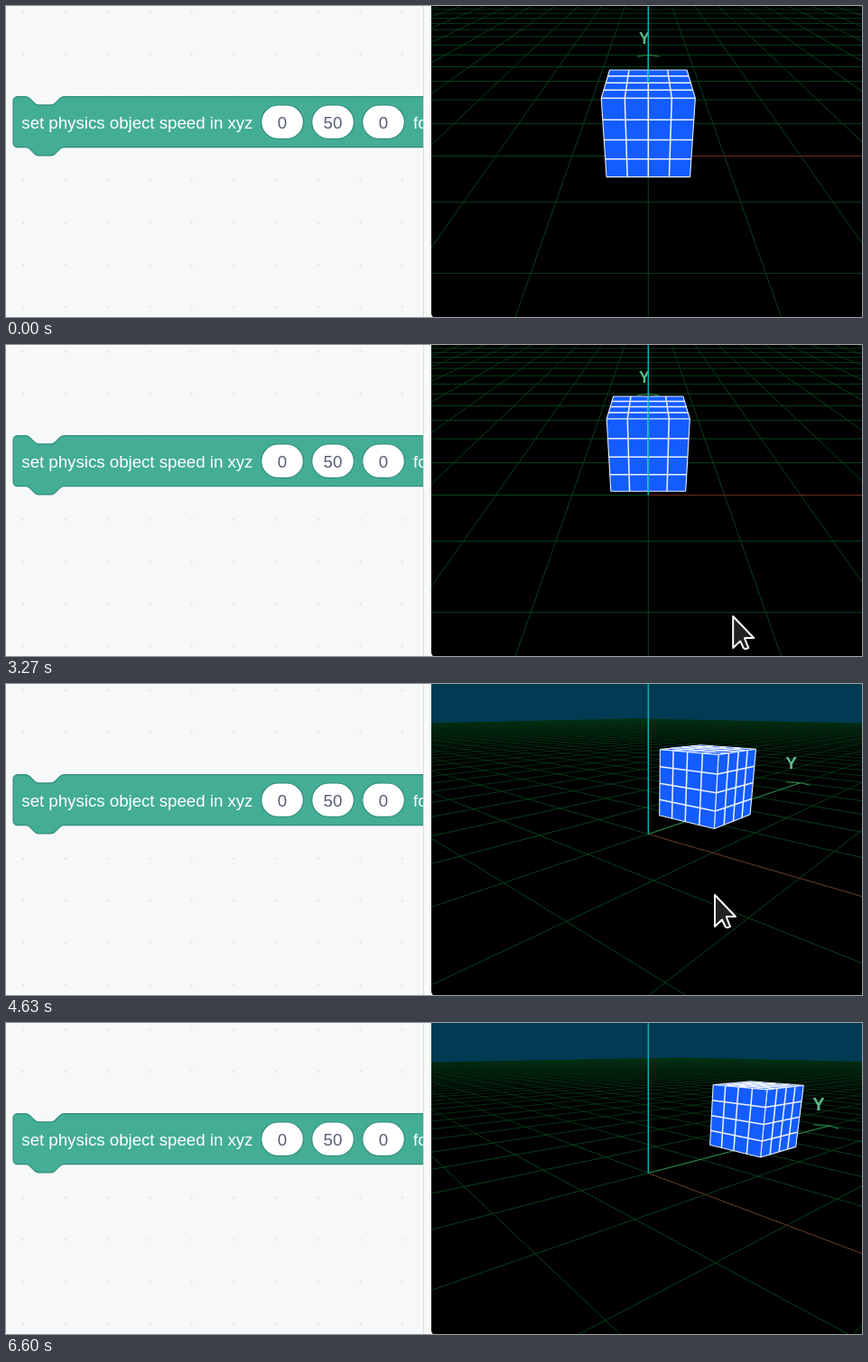
Write an HTML page with a canvas that moves like this. It is 948x345 px and loops after 6.63 s.

```html
<!DOCTYPE html>
<html lang="en">
<head>
<meta charset="utf-8">
<title>Block and cube</title>
<style>
  html, body { margin: 0; width: 100%; height: 100%; overflow: hidden; background: #f7faf6; }
  #stage { position: relative; width: 948px; height: 345px; overflow: hidden; }
  #stage > * { position: absolute; top: 0; left: 0; }
  #stage > #view { left: 471px; top: -14px; border-radius: 5px; }
  text { font: 18.667px "Liberation Sans", Arial, sans-serif; fill: #fff; }
  .num text { fill: #575e75; text-anchor: middle; }
  .glow { filter: drop-shadow(0 0 3px #fff200) drop-shadow(0 0 2px #fff200); }
  #cursor { filter: drop-shadow(1px 2px 1.5px rgba(0, 0, 0, .4)); }
</style>
</head>
<body>
<div id="stage">
  <svg width="463" height="345">
    <defs>
      <pattern id="dots" x="-4.3" y="-16.3" width="46.667" height="46.667" patternUnits="userSpaceOnUse">
        <rect x="22.3" y="22.3" width="2.2" height="2.2" rx=".6" fill="#dfe1e5"/>
      </pattern>
    </defs>
    <rect width="463" height="345" fill="#f7f8fa"/>
    <rect width="463" height="345" fill="url(#dots)"/>
    <path id="block" transform="translate(8 100.6) scale(1.16667)" fill="#44ad96" stroke="#2f8d78"
      d="M0 4A4 4 0 0 1 4 0H12c2 0 3 1 4 2l4 4c1 1 2 2 4 2h12c2 0 3-1 4-2l4-4c1-1 2-2 4-2H450V48H48c-2 0-3 1-4 2l-4 4c-1 1-2 2-4 2h-12c-2 0-3-1-4-2l-4-4c-1-1-2-2-4-2H4a4 4 0 0 1-4-4z"/>
    <text x="17.3" y="136">set physics object speed in xyz</text>
    <g class="num" id="nums"></g>
    <text x="451" y="136">for</text>
    <rect x="462" width="1" height="345" fill="#d9dedb"/>
  </svg>
  <canvas id="view" width="480" height="360"></canvas>
  <svg width="948" height="345">
    <path id="cursor" d="M0 1V36L8 28.5L11.5 36Q13.5 38.5 17 36L13 26V25H23Z"
      fill="#222" stroke="#fff" stroke-width="2" stroke-linejoin="round"/>
  </svg>
</div>
<script>
const LOOP = 6630, FOCAL = 415.7, DIST = 4.925, HALF = 50, NEAR = 0.1;
const $ = id => document.getElementById(id);
const ctx = $('view').getContext('2d');
const cursor = $('cursor');

$('nums').innerHTML = [[306, 0], [362, 50], [418, 0]].map(([x, n]) =>
  `<rect x="${x - 23.3}" y="110" width="46.67" height="37.33" rx="18.67" fill="#fff" stroke="#2f8d78" stroke-width="1.17"/>
   <text x="${x}" y="136">${n}</text>`).join('');

const ramp = (t, a, b) => Math.min(1, Math.max(0, (t - a) / (b - a)));
const smooth = (t, a, b) => { const u = ramp(t, a, b); return u * u * (3 - 2 * u); };
const mix = (a, b, u) => a + (b - a) * u;

let sinE, cosE, sinB, cosB;

function setCamera(elevation, azimuth) {
  const rad = Math.PI / 180;
  sinE = Math.sin(elevation * rad); cosE = Math.cos(elevation * rad);
  sinB = Math.sin(azimuth * rad); cosB = Math.cos(azimuth * rad);
}

// World point to camera space: right, up, depth
function toCamera([x, y, z]) {
  const q = y * cosB - x * sinB;
  return [x * cosB + y * sinB, q * sinE + z * cosE, DIST + q * cosE - z * sinE];
}

const toScreen = ([r, u, d]) => [FOCAL * r / d, -FOCAL * u / d];

// Screen ends of a segment, cut at the near plane
function clip(a, b) {
  a = toCamera(a); b = toCamera(b);
  if (a[2] < NEAR && b[2] < NEAR) return [];
  const cut = (p, o) => p[2] >= NEAR ? p :
    p.map((v, i) => mix(v, o[i], (NEAR - p[2]) / (o[2] - p[2])));
  return [cut(a, b), cut(b, a)].map(toScreen);
}

function addLine(a, b) {
  const ends = clip(a, b);
  if (!ends.length) return;
  ctx.moveTo(...ends[0]);
  ctx.lineTo(...ends[1]);
}

function lines(color, width, segments) {
  ctx.beginPath();
  segments.forEach(s => addLine(...s));
  ctx.strokeStyle = color;
  ctx.lineWidth = width;
  ctx.stroke();
}

function fillPoly(color, points) {
  ctx.beginPath();
  points.forEach((p, i) =>
    clip(p, points[(i + 1) % points.length]).forEach(s => ctx.lineTo(...s)));
  ctx.fillStyle = color;
  ctx.fill();
}

function drawGround() {
  fillPoly('#000', [[-HALF, -HALF, 0], [-HALF, HALF, 0], [HALF, HALF, 0], [HALF, -HALF, 0]]);
  const horizon = -FOCAL * sinE / cosE;
  const fade = ctx.createLinearGradient(0, horizon + 5, 0, horizon + 120);
  fade.addColorStop(0, 'rgba(4,66,26,.06)');
  fade.addColorStop(.25, 'rgba(4,66,26,.5)');
  fade.addColorStop(1, 'rgb(4,66,26)');
  const grid = [];
  for (let i = -HALF; i <= HALF; i++) {
    grid.push([[i, -HALF, 0], [i, HALF, 0]], [[-HALF, i, 0], [HALF, i, 0]]);
  }
  lines(fade, 1, grid);
}

function drawAxes() {
  const tip = [0, 5, 0];
  lines('#6c2a1f', 1, [[[0, 0, 0], [5, 0, 0]]]);
  lines('#2c8c48', 1, [[[0, 0, 0], tip], [tip, [-.27, 4.85, 0]], [tip, [.27, 4.85, 0]]]);
  const label = toCamera([-.09, 4.58, .46]);
  ctx.font = `bold ${FOCAL * .37 / label[2]}px "Liberation Sans", Arial, sans-serif`;
  ctx.textAlign = 'center';
  ctx.textBaseline = 'middle';
  ctx.fillStyle = '#5cbb8a';
  ctx.fillText('Y', ...toScreen(label));
}

// Unit square at corner o spanned by u and v, with four cells each way
function drawFace(o, u, v) {
  const at = (a, b) => o.map((c, i) => c + a * u[i] + b * v[i]);
  fillPoly('#145cff', [at(0, 0), at(1, 0), at(1, 1), at(0, 1)]);
  const inner = [], edge = [];
  for (let i = 0; i <= 4; i++) {
    (i % 4 ? inner : edge).push([at(i / 4, 0), at(i / 4, 1)], [at(0, i / 4), at(1, i / 4)]);
  }
  lines('#eef3ff', 1.5, inner);
  lines('#e4ecff', 1.1, edge);
}

function drawCube(y) {
  const X = [1, 0, 0], Y = [0, 1, 0], Z = [0, 0, 1];
  drawFace([-.5, y - .5, 1], X, Y);
  if (DIST * cosE * sinB > .5) drawFace([.5, y - .5, 0], Y, Z);
  drawFace([-.5, y - .5, 0], X, Z);
}

function drawScene(t) {
  const lag = Math.max(0, t - 3850) / 229;
  setCamera(mix(30, 18.3, smooth(t, 3500, 4400)), 50.2 * (1 - (1 + lag) * Math.exp(-lag)));
  const y = Math.max(0, t - 2067) * .000503;

  ctx.setTransform(1, 0, 0, 1, 0, 0);
  ctx.fillStyle = '#003a53';
  ctx.fillRect(0, 0, 480, 360);
  ctx.translate(240.3, 180.5);
  drawGround();
  drawAxes();
  drawCube(y);
  // The cube hides the foot of the upright axis until it has moved past it
  lines('#08b4b4', 1.4, [[[0, 0, y < .5 ? 1 : 0], [0, 0, 3.5]]]);
}

function cursorAt(t) {
  if (t < 1200) {
    const u = ramp(t, 200, 800), v = 1 - u, w = ramp(t, 800, 1100);
    return [v * v * 285 + 2 * u * v * 300 + u * u * 382 - 5 * w,
            v * v * 70 + 2 * u * v * 205 + u * u * 131 - 2 * w];
  }
  const stops = [
    [1200, 1700, 216, 134], [2650, 3320, 816, 303], [3370, 3800, 876, 235],
    [3840, 4300, 785, 233], [5650, 6100, 537, 14]
  ];
  return stops.reduce(([x, y], [a, b, nx, ny]) => {
    const u = smooth(t, a, b);
    return [mix(x, nx, u), mix(y, ny, u)];
  }, [377, 129]);
}

function draw(now) {
  const time = now % LOOP;
  // Slow steps at first, then thirty pictures a second
  const t = time < 1966 ? Math.floor(time / 100) * 100 : Math.floor((time + 4) * .03) / .03;
  drawScene(t);
  $('block').classList.toggle('glow', t > 1960 && t < 2060);
  cursor.style.display = t < 200 || t > 6120 ? 'none' : '';
  cursor.setAttribute('transform', `translate(${cursorAt(t)})`);
  requestAnimationFrame(draw);
}

const start = performance.now();
const tick = draw;
draw = () => tick(performance.now() - start);
draw();
</script>
</body>
</html>
```
